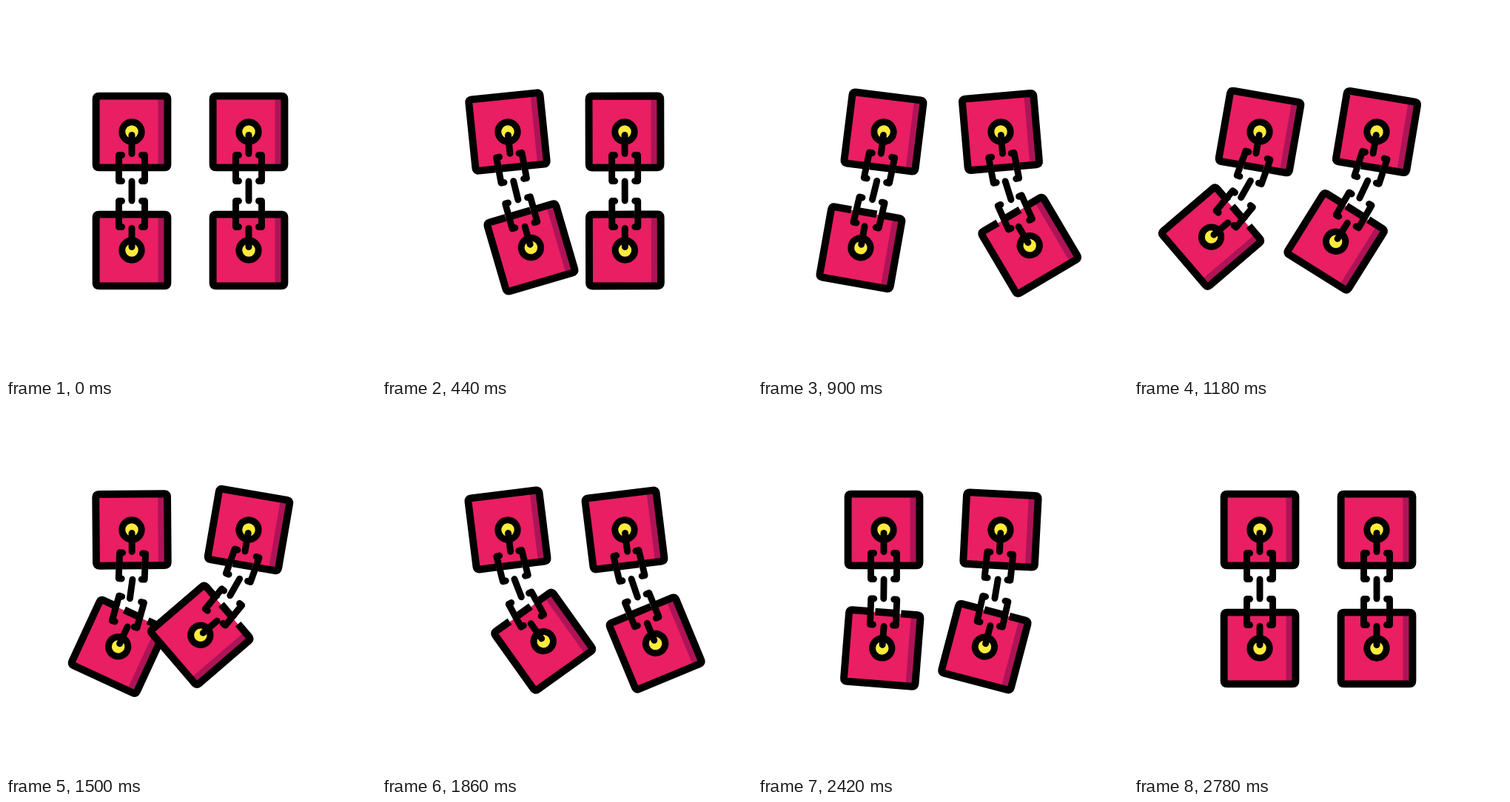
Animation of 500 by 500 pixels, one loop 3.2 s. Source, as an HTML page with a canvas:

```html
<!DOCTYPE html>
<html>
<head>
<meta charset="utf-8">
<style>
  html, body { margin: 0; width: 100%; height: 100%; overflow: hidden; background: #fff; }
  canvas { display: block; width: 500px; height: 500px; }
</style>
</head>
<body>
<canvas width="500" height="500"></canvas>
<script>
const ctx = document.querySelector('canvas').getContext('2d');
const LOOP = 3200, LAG = 40;

// Swing of one joint: [ms, degrees]
const KEYS = [
  [0, 0], [325, -6.6], [385, -6.6], [845, 9.9], [1065, 9.9],
  [1490, -7.1], [1680, -7.1], [1920, 3.2], [1970, 3.2], [2220, 0]
];

const ease = x => x * x / (x * x + (1 - x) * (1 - x));

function swing(t) {
  if (t <= 0) return 0;
  const i = KEYS.findIndex(key => key[0] > t);
  if (i < 0) return 0;
  const [t0, a0] = KEYS[i - 1], [t1, a1] = KEYS[i];
  return (a0 + (a1 - a0) * ease((t - t0) / (t1 - t0))) * Math.PI / 180;
}

// Square outline, broken where the bracket legs cross it
const outline = new Path2D(
  'M-21.7 48.4H-44.4Q-48.4 48.4 -48.4 44.4V-44.4Q-48.4 -48.4 -44.4 -48.4' +
  'H44.4Q48.4 -48.4 48.4 -44.4V44.4Q48.4 48.4 44.4 48.4H21.7M-13.3 48.4H13.3');
const bracketPath = new Path2D(
  'M-13.5 -17.5H-17.5V17.5H-13.5M13.5 -17.5H17.5V17.5H13.5');

function line(y0, y1) {
  ctx.beginPath();
  ctx.moveTo(0, y0);
  ctx.lineTo(0, y1);
  ctx.stroke();
}

// Square with its ring; side is 1 when the chain hangs below, -1 when above
function square(side) {
  ctx.fillStyle = '#e91e63';
  ctx.fillRect(-48, -48, 96, 96);
  ctx.fillStyle = '#ad1457';
  ctx.fillRect(35.5, -48, 12.5, 96);

  ctx.save();
  ctx.scale(1, side);
  ctx.lineCap = 'butt';
  ctx.lineWidth = 9.9;
  ctx.stroke(outline);
  ctx.restore();

  ctx.fillStyle = '#ffeb3b';
  ctx.beginPath();
  ctx.arc(0, 0, 13.2, 0, 7);
  ctx.fill();
  ctx.stroke();
  line(4.5 * side, 29.5 * side);
}

const bracket = () => ctx.stroke(bracketPath);

// Each part hangs from the one before it, at this distance
const PARTS = [
  { distance: 0, draw: () => square(1) },
  { distance: 49, draw: bracket },
  { distance: 31, draw: () => line(-13, 13) },
  { distance: 31, draw: bracket },
  { distance: 49, draw: () => square(-1) }
];
const PAINT_ORDER = [0, 4, 1, 2, 3];

function chain(x, t) {
  ctx.save();
  ctx.translate(x, 170);
  const poses = PARTS.map(({ distance }, i) => {
    ctx.translate(0, distance);
    ctx.rotate(swing(t - i * LAG));
    return ctx.getTransform();
  });
  for (const i of PAINT_ORDER) {
    ctx.setTransform(poses[i]);
    PARTS[i].draw();
  }
  ctx.restore();
}

function frame() {
  const t = performance.now() % LOOP;
  ctx.fillStyle = '#fff';
  ctx.fillRect(0, 0, 500, 500);
  ctx.strokeStyle = '#000';
  ctx.lineWidth = 8.9;
  ctx.lineCap = ctx.lineJoin = 'round';
  chain(170, t - 200);
  chain(328, t - 400);
  requestAnimationFrame(frame);
}
frame();
</script>
</body>
</html>
```
